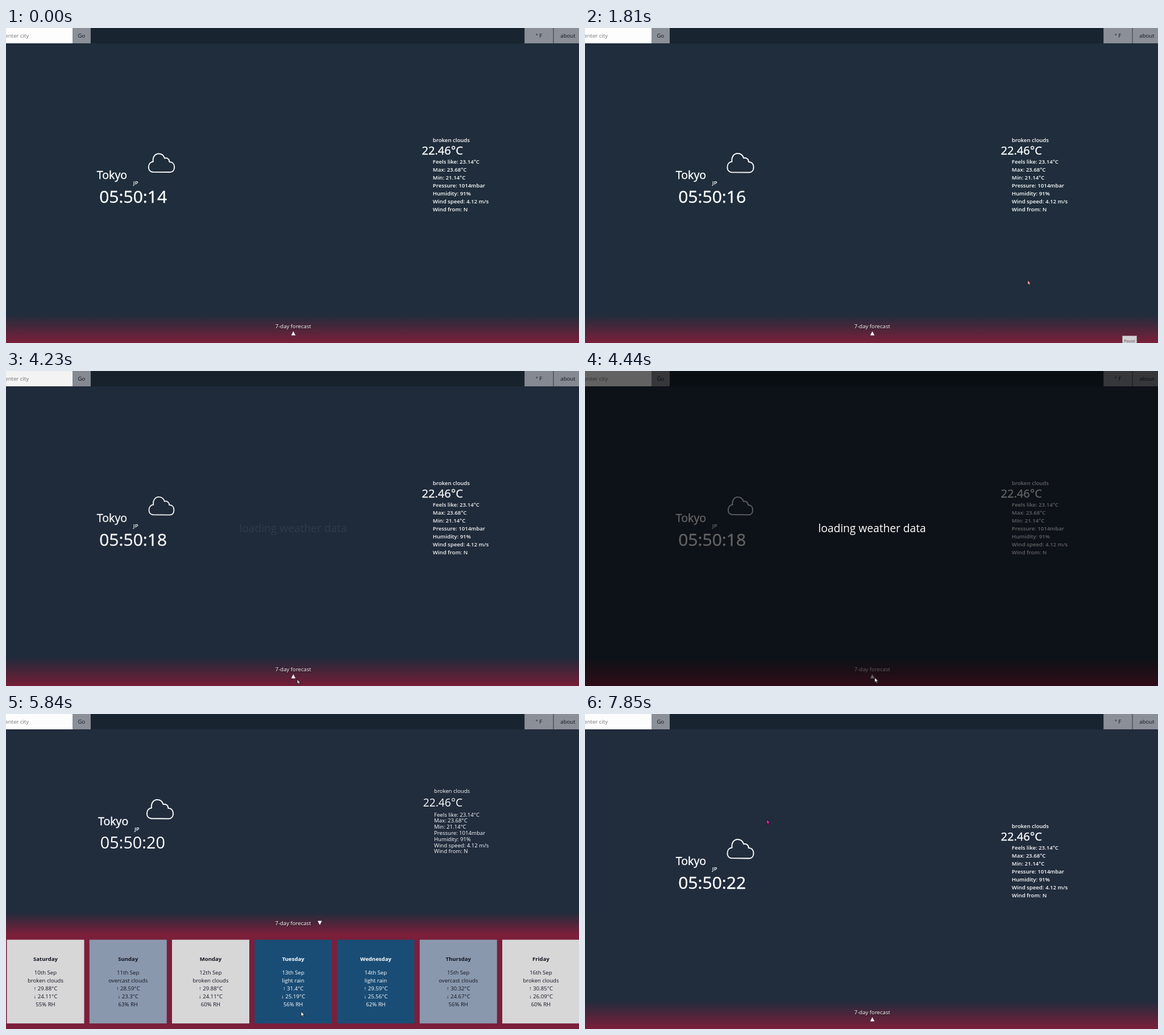
An HTML page that plays this animation: 1008x555 px, repeating every 8000 ms.

```html
<!DOCTYPE html>
<html lang="en">
<head>
<meta charset="utf-8">
<title>Weather</title>
<style>
  html, body { margin: 0; width: 100%; height: 100%; overflow: hidden; background: #1f2d3c; }
  svg { display: block; width: 1008px; height: 555px; }
  text { font: 9.6px "Open Sans", "Noto Sans", sans-serif; fill: #fff; white-space: pre; }
  .mid { text-anchor: middle; }
  .dark { fill: #12141f; }
  .semi { font-weight: 600; }
  .thick { stroke: #fff; stroke-width: .4px; }
  .shadow { filter: drop-shadow(1px 1px 1px rgba(0,0,0,.6)); }
</style>
</head>
<body>
<svg id="stage" viewBox="0 0 1008 555">
  <defs>
    <linearGradient id="fade" x2="0" y2="1">
      <stop offset="0" stop-color="#7b1f3a" stop-opacity="0"/>
      <stop offset="1" stop-color="#7b1f3a"/>
    </linearGradient>
  </defs>
  <rect id="sky" width="1008" height="555"/>
  <rect width="1008" height="27" fill="#18242f"/>
  <rect width="117" height="27" fill="#fdfdfd"/>
  <text x="-1.7" y="17" style="fill:#757575">enter city</text>
  <rect x="117" width="32" height="27" fill="#8b8f97"/>
  <text class="mid dark" x="133" y="17">Go</text>
  <g id="buttons">
    <rect x="912.2" width="50.4" height="27" fill="#8b8f97"/>
    <rect x="963.4" width="50.4" height="27" fill="#8b8f97"/>
    <text class="mid dark" x="937.5" y="17">° F</text>
    <text class="mid dark" x="988.5" y="17">about</text>
  </g>
  <g id="place">
    <text class="thick" x="159.8" y="265.5" style="font-size:19.6px">Tokyo</text>
    <text class="semi" x="223.8" y="276">JP</text>
  </g>
  <text id="clock"></text>
  <path id="cloud" fill="none" stroke="#f6f6f6" stroke-width="2" stroke-linejoin="round"
    d="M-15,15.7C-19.5,15.3-22.5,12-22.5,7.5C-22.5,2-19.5,-2-14.5,-2.5C-16,-10.5-11,-16.5-5,-16.5C0,-16.5 4,-13.5 5.5,-8.5C10,-10 14,-6.5 14,-2C19.5,-2 22.5,2 22.5,7C22.5,12.5 19.5,16 15,16Z"/>
  <g id="details"></g>
  <rect id="glow" width="1008" fill="url(#fade)"/>
  <rect id="floor" y="388" width="1008" height="167" fill="#7b1f3a"/>
  <g id="forecast"></g>
  <text id="label" class="mid shadow">7-day forecast</text>
  <path id="arrow" d="M0,-3.7L3.7,3.5H-3.7Z" fill="#fff"/>
  <g id="scrollbars">
    <rect x="1003" width="5" height="555" fill="#1f2a36"/>
    <rect x="1004" y="10" width="4" height="513" fill="#747981"/>
    <rect y="544" width="1008" height="11" fill="#1f2a36"/>
    <rect x="7" y="545" width="974" height="9" fill="#747981"/>
    <path d="M3.5,547L1,549.5L3.5,552M997.5,547L1000,549.5L997.5,552" fill="none" stroke="#8b8f97"/>
  </g>
  <g id="loading">
    <rect width="1008" height="555" opacity=".61"/>
    <text class="mid" x="505" y="284" style="font-size:19.2px">loading weather data</text>
  </g>
  <g id="tip">
    <rect x="945.5" y="542.5" width="25" height="16" fill="#d5d0d5" stroke="#999"/>
    <text class="mid" x="958" y="553.5" style="font-size:7px;fill:#555">Pause</text>
  </g>
  <circle id="click" r="7.5" fill="#b3a21d"/>
  <path id="pointer" d="M0,0V8.6L2,6.9L3.5,10L5,9.3L3.6,6.3H6.3Z" stroke="#15151d" stroke-width=".9"/>
</svg>
<script>
const LOOP = 8000, STEP = 201.5;
const LOAD = 4220, OPEN = 4600, CLOSE = 7200;
const el = Object.fromEntries([...document.querySelectorAll("[id]")].map(e => [e.id, e]));

function set(node, attrs) {
  for (const name in attrs) node.setAttribute(name, attrs[name]);
  return node;
}
function add(parent, tag, attrs, text = "") {
  const node = set(document.createElementNS("http://www.w3.org/2000/svg", tag), attrs);
  node.textContent = text;
  parent.append(node);
  return node;
}
const show = (node, on) => set(node, { display: on ? "inline" : "none" });
const clamp = x => Math.min(1, Math.max(0, x));

const details = ["broken clouds", "22.46°C", "Feels like: 23.14°C", "Max: 23.68°C", "Min: 21.14°C",
  "Pressure: 1014mbar", "Humidity: 91%", "Wind speed: 4.12 m/s", "Wind from: N"]
  .map(line => add(el.details, "text", {}, line));

const skies = {
  "broken clouds": ["#d7d7d8", "#12141f"],
  "overcast clouds": ["#8a98ad", "#12141f"],
  "light rain": ["#1a4d76", "#fff"]
};
const cards = [
  ["Saturday", "broken clouds", 29.88, 24.11, 55],
  ["Sunday", "overcast clouds", 28.59, 23.3, 63],
  ["Monday", "broken clouds", 29.88, 24.11, 60],
  ["Tuesday", "light rain", 31.4, 25.19, 56],
  ["Wednesday", "light rain", 29.59, 25.56, 62],
  ["Thursday", "overcast clouds", 30.32, 24.67, 56],
  ["Friday", "broken clouds", 30.85, 26.09, 60]
].map(([day, sky, high, low, humidity], i) => {
  const [fill, ink] = skies[sky];
  const group = add(el.forecast, "g", {});
  const box = add(group, "rect", { y: 398.5, height: 147.5, fill });
  const lines = [day, `${10 + i}th Sep`, sky, `↑ ${high}°C`, `↓ ${low}°C`, `${humidity}% RH`]
    .map((line, k) => add(group, "text", {
      class: "mid", y: k ? 459.5 + (k - 1) * 14.15 : 436,
      style: `fill:${ink};font-weight:${k ? 400 : 700}`
    }, line));
  return { group, box, lines };
});

// time, x, y
const route = [
  [1800, 785, 449.5], [2100, 640, 330], [2500, 240, 110], [2850, 68, 33], [3050, 56, 15],
  [3300, 110, 90], [3900, 511, 545], [4230, 512, 543], [4433, 509.5, 540],
  [5750, 509.5, 540], [6250, 560, 455], [6650, 592, 393], [6850, 592, 393],
  [7050, 550, 362], [7300, 550, 362], [7858, 319.5, 185.5]
];
function pointerAt(t) {
  const i = route.findIndex(p => p[0] >= t);
  if (i < 0) return route.at(-1).slice(1);
  if (i === 0) return route[0].slice(1);
  const [t0, x0, y0] = route[i - 1], [t1, x1, y1] = route[i];
  const k = (t - t0) / (t1 - t0);
  return [x0 + (x1 - x0) * k, y0 + (y1 - y0) * k];
}

function drawDetails(open) {
  details.forEach((node, i) => {
    const big = i === 1, row = i - 2;
    const y = open
      ? (i === 0 ? 138.5 : big ? 163 : 180.5 + row * 10.82)
      : (i === 0 ? 200.5 : big ? 223.4 : 238.5 + row * 14.15);
    set(node, {
      x: (big ? 731.6 : 750.8) + (open ? 2.2 : 0), y,
      class: open ? "" : big ? "thick" : "semi",
      style: `font-size:${big ? (open ? 19.2 : 20) : 9.6}px`
    });
  });
}

function drawForecast(t, open, bars) {
  show(el.forecast, open);
  show(el.floor, open);
  set(el.glow, open ? { y: 350, height: 38 } : { y: 505, height: 50 });
  set(el.label, open ? { x: bars ? 500.5 : 505, y: 372 } : { x: 505.3, y: 529.2 });
  const turn = open ? 180 * clamp((t - OPEN) / 500) : 0;
  const at = open ? (bars ? "546.5,369" : "552,368") : "505.5,538";
  set(el.arrow, { transform: `translate(${at}) rotate(${turn})` });
  const width = bars ? 134.5 : 136, pitch = bars ? 143.85 : 145.25;
  cards.forEach(({ group, box, lines }, i) => {
    set(group, { transform: `translate(${1.5 + i * pitch},${bars ? 0.5 : -0.8})` });
    set(box, { width });
    lines.forEach(line => set(line, { x: width / 2 }));
  });
}

function draw(t) {
  const open = t >= OPEN && t < CLOSE;
  const bars = open && t < 4800;
  set(el.sky, { fill: t < LOAD ? "#1f2d3c" : "#212c3d" });
  set(el.buttons, { transform: `translate(${bars ? -10 : 0})` });
  show(el.scrollbars, bars);

  set(el.place, { transform: open ? "translate(2.2,-70)" : "" });
  el.clock.textContent = `05:50:${14 + Math.floor((t + 200) / 1000)}`;
  set(el.clock, {
    x: open ? 165.8 : 164.2, y: open ? 237 : 307.5,
    class: open ? "" : "thick",
    style: `font-size:${open ? 28.8 : 30}px`
  });
  const scale = 1 + 0.043 * Math.cos((t - 1550) / 1000 * Math.PI);
  set(el.cloud, { transform: `translate(${open ? "271,168" : "273.5,238"}) scale(${scale})` });
  drawDetails(open);
  drawForecast(t, open, bars);

  set(el.loading, { opacity: t < OPEN ? clamp((t - LOAD) / 180) : 0 });
  show(el.tip, t > 1000 && t < 2300);

  const [x, y] = pointerAt(t);
  show(el.pointer, t >= 1800);
  set(el.pointer, {
    transform: `translate(${x},${y})`,
    fill: t < 3000 ? "#ef9aa2" : t < 4400 ? "#c9c4cb" : t < CLOSE ? "#f4f4f4" : "#f01fa8"
  });
  show(el.click, (t > 3900 && t < 4100) || (t > 7000 && t < CLOSE));
  set(el.click, { cx: x + 1.5, cy: y + 3 });
}

const start = performance.now();
function tick() {
  const t = (performance.now() - start) % LOOP;
  draw(Math.floor((t + 15) / STEP) * STEP);
  requestAnimationFrame(tick);
}
tick();
</script>
</body>
</html>
```
